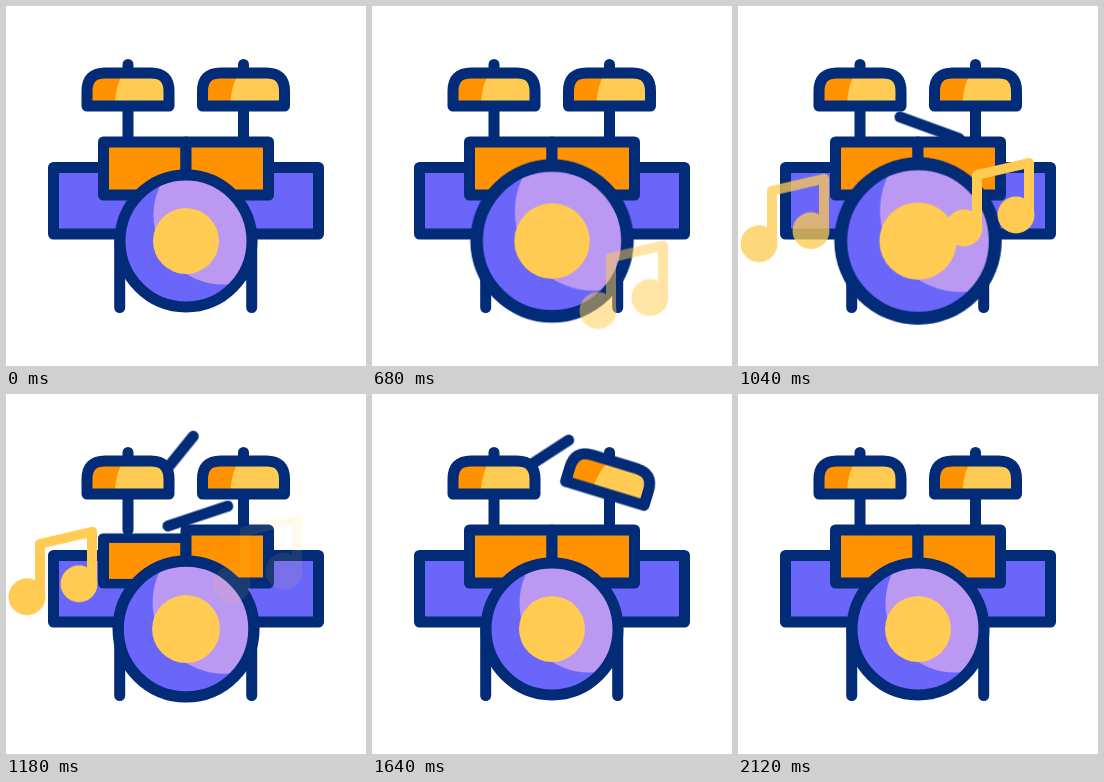
These frames come from a looping animation (360 px wide and 360 px high, 2400 ms). An HTML page:

```html
<!DOCTYPE html>
<html lang="en">
<head>
<meta charset="utf-8">
<title>Drum kit</title>
<style>
  html, body { margin: 0; width: 100%; height: 100%; overflow: hidden; background: #fff; }
  svg { display: block; width: 100vw; height: 100vh; }

  .line { stroke: #022b78; stroke-width: 11; stroke-linecap: round; stroke-linejoin: round; fill: none; }
  .violet { fill: #6b66fa; }
  .lilac { fill: #bb99f2; }
  .orange { fill: #ff9200; }
  .yellow { fill: #ffcb52; }
  .beam { fill: none; stroke: #ffcb52; stroke-width: 10; stroke-linejoin: round; }

  .move { animation: 2400ms linear infinite; }
  #bass { transform-origin: 180px 235px; animation-name: bass; animation-timing-function: cubic-bezier(.4, .1, .6, .9); }
  #tom { transform-origin: 139px 194px; animation-name: tom; }
  #ride { transform-origin: 237.5px 84px; animation-name: ride; animation-timing-function: ease-in-out; }
  #high { animation-name: high; animation-timing-function: ease-in-out; }
  #low { animation-name: low; animation-timing-function: ease-in-out; }
  #noteR { animation-name: noteR; }
  #noteL { animation-name: noteL; }

  @keyframes bass {
    0%, .83%, 14.17%, 23.33%, 37.5%, 50.83%, 100% { transform: scale(1); }
    7.5%, 30.42%, 44.17% { transform: scale(1.18); }
  }
  @keyframes tom {
    0%, 47.5%, 53.33%, 56.67%, 64.17%, 100% { transform: scaleY(1); }
    49.17%, 58.33% { transform: scaleY(.86); }
    60.83% { transform: scaleY(.89); }
  }
  @keyframes ride {
    0%, 58.33%, 88%, 100% { transform: rotate(0); }
    60.83% { transform: rotate(-9deg); }
    68.33% { transform: rotate(17deg); }
    74% { transform: rotate(-10deg); }
    79% { transform: rotate(6deg); }
    84% { transform: rotate(-3deg); }
  }
  @keyframes high {
    0%, 45%, 75.83%, 100% { transform: translate(92px, 88px) rotate(0deg); }
    49.17% { transform: translate(147px, 92px) rotate(-51deg); }
    53.33% { transform: translate(145px, 86px) rotate(-49deg); }
    58.75%, 60.83% { transform: translate(138px, 59px) rotate(6.4deg); }
    68.33% { transform: translate(143px, 81px) rotate(-33deg); }
    71.67% { transform: translate(145px, 88px) rotate(-50deg); }
  }
  @keyframes low {
    0%, 32.5%, 67.5%, 100% { transform: translate(196px, 158px) rotate(8deg); }
    35.83% { transform: translate(189px, 122px) rotate(18deg); }
    40.83%, 45% { transform: translate(162px, 111px) rotate(20deg); }
    49.17%, 58.33% { transform: translate(162px, 132px) rotate(-18.4deg); }
    54.17%, 60.83% { transform: translate(162px, 112px) rotate(20deg); }
    64.17% { transform: translate(188px, 124px) rotate(18deg); }
  }
  @keyframes noteR {
    0%, 26.67% { transform: translate(226px, 314px); opacity: 0; }
    30% { opacity: 1; }
    35.83% { transform: translate(226px, 263px); }
    45.83% { opacity: 1; }
    49.6%, 100% { transform: translate(226px, 188px); opacity: 0; }
  }
  @keyframes noteL {
    0%, 40.83% { transform: translate(21px, 253px); opacity: 0; }
    44.17% { opacity: 1; }
    49.17% { transform: translate(21px, 203px); }
    60.83% { transform: translate(21px, 132px); opacity: 1; }
    66.67%, 100% { transform: translate(21px, 104px); opacity: 0; }
  }
</style>
</head>
<body>
<svg viewBox="0 0 360 360">
  <defs>
    <clipPath id="skin"><circle cx="180" cy="235" r="64"/></clipPath>
    <g id="cymbal">
      <path class="orange" d="M81 100V85Q81 67 99 67H145Q163 67 163 85V100Z"/>
      <path class="yellow" d="M118 67Q109 79 109 100H163V85Q163 67 145 67Z"/>
      <path class="line" d="M81 100V85Q81 67 99 67H145Q163 67 163 85V100Z"/>
    </g>
    <g id="note">
      <path class="beam" d="M13 0V-53L65 -65V-13"/>
      <g class="yellow"><circle r="18.5"/><circle cx="52" cy="-13" r="18.5"/></g>
    </g>
  </defs>

  <path class="line" style="fill:#6b66fa" d="M47.5 161.5H312.5V228H47.5Z"/>
  <path class="line" d="M122 58.5V136M237.5 58.5V136"/>

  <path id="high" class="line move" d="M0 0H64"/>
  <path id="low" class="line move" d="M0 0H63"/>

  <use href="#cymbal"/>
  <g id="ride" class="move"><use href="#cymbal" x="115.5"/></g>

  <path id="tom" class="line move" style="fill:#ff9200" d="M97.5 136H180V189H97.5Z"/>
  <path class="line" style="fill:#ff9200" d="M180 136H262.5V189H180Z"/>

  <path class="line" d="M113.7 235V301.5M245.7 235V301.5"/>
  <g id="bass" class="move">
    <circle class="violet" cx="180" cy="235" r="66"/>
    <circle class="lilac" cx="217" cy="209" r="69.5" clip-path="url(#skin)"/>
    <circle class="yellow" cx="180" cy="235" r="33"/>
    <circle class="line" cx="180" cy="235" r="66"/>
  </g>

  <g id="noteR" class="move"><use href="#note"/></g>
  <g id="noteL" class="move"><use href="#note"/></g>
</svg>
</body>
</html>
```
